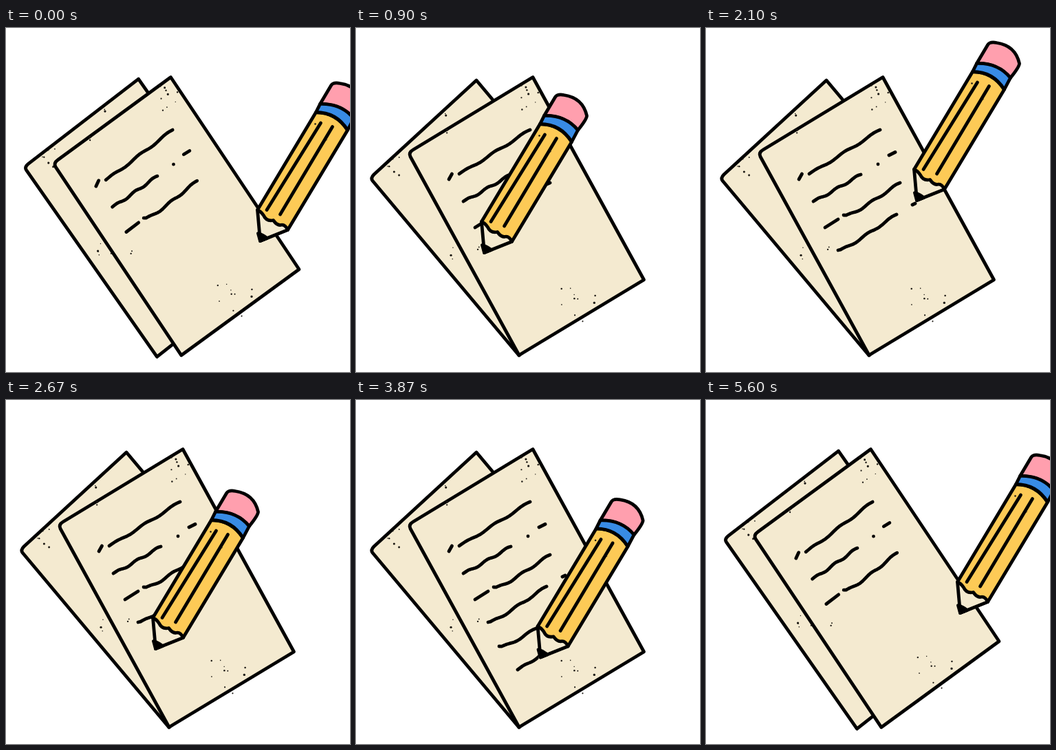
An HTML page with a canvas that plays this animation: 500x500 px, repeating every 5.73 s.

```html
<!DOCTYPE html>
<html lang="en">
<head>
<meta charset="utf-8">
<title>Pencil and paper</title>
<style>
html, body { margin: 0; width: 100%; height: 100%; overflow: hidden; background: #fff; }
canvas { display: block; }
</style>
</head>
<body>
<canvas id="stage" width="500" height="500"></canvas>
<script>
const ctx = document.getElementById('stage').getContext('2d');
const LOOP = 5730, PAPER = '#f4ead0', INK = '#000';

const point = (x, y) => ({ x, y });
const clamp = v => Math.min(1, Math.max(0, v));
const smooth = v => v * v * (3 - 2 * v);
const mix = (a, b, u) => point(a.x + (b.x - a.x) * u, a.y + (b.y - a.y) * u);

// The pencil arrives at a line, writes it from start to end, then moves on
const rest = point(371, 310);
const passes = [
  { start: point(188, 327), end: point(308, 251), arrive: 11, write: 14.8, done: 26 },
  { start: point(219, 362), end: point(338, 285), arrive: 33, write: 34, done: 40 },
  { start: point(235, 397), end: point(356, 318), arrive: 46, write: 46, done: 53 }
];
const wipe = { from: 57.8, to: 70, width: 120 };

function tipAt(step) {
  let at = rest, left = 0;
  for (const p of passes) {
    if (step < p.arrive) return mix(at, p.start, smooth((step - left) / (p.arrive - left)));
    if (step < p.done) return mix(p.start, p.end, clamp((step - p.write) / (p.done - p.write)));
    at = p.end;
    left = p.done;
  }
  return mix(at, rest, clamp(step - left));
}

// Handwritten line: a sagging bow with a slight ripple
function scribble(x0, y0, x1, y1, bow) {
  ctx.beginPath();
  for (let u = 0; u <= 1.001; u += 1 / 24) {
    const sag = bow * Math.sin(Math.PI * Math.sqrt(u)) - 1.4 * Math.sin(5 * Math.PI * u);
    ctx.lineTo(x0 + (x1 - x0) * u, y0 + (y1 - y0) * u + sag);
  }
  ctx.stroke();
}

function dash(x, y, dx = 0, dy = -dx * 0.5) {
  ctx.beginPath();
  ctx.moveTo(x, y);
  ctx.lineTo(x + dx, y + dy);
  ctx.stroke();
}

function shape(d, fill) {
  const path = new Path2D(d);
  ctx.fillStyle = fill;
  ctx.fill(path);
  ctx.stroke(path);
}

function speck(x, y, r) {
  ctx.fillStyle = '#1a1712';
  ctx.beginPath();
  ctx.arc(x, y, r, 0, 7);
  ctx.fill();
}

// Seeded patch of ink specks
function specks(x, y, w, h, count) {
  let seed = x * 31 + y;
  const random = () => (seed = (seed * 16807 + 11) % 2147483647) / 2147483647;
  random();
  for (let i = 0; i < count; i++) {
    speck(x + (random() - 0.5) * w, y + (random() - 0.5) * h, 0.7 + random());
  }
}

function turned(cx, cy, degrees, paint) {
  ctx.save();
  ctx.translate(cx, cy);
  ctx.rotate(degrees * Math.PI / 180);
  ctx.translate(-cx, -cy);
  paint();
  ctx.restore();
}

function backSheet() {
  shape('M176 77 L27 214 Q22 219 25 223 L238 477 L391 333 Z', PAPER);
  specks(130, 133, 8, 16, 2);
  specks(60, 202, 40, 30, 6);
  specks(149, 331, 20, 30, 4);
}

function frontSheet() {
  shape('M258 72.5 L84 178 Q77 182 80 188 L238 476.5 L419.5 367 Z', PAPER);
  specks(252, 102, 28, 36, 9);
  specks(137, 150, 30, 10, 2);
  specks(179, 322, 4, 8, 2);
  specks(320, 400, 62, 56, 10);

  dash(136, 221, 4.5, -8);
  scribble(151, 213, 254, 149, 1);
  dash(251, 199);
  dash(267, 186, 9);
  scribble(157, 253, 226, 214, 1);
  dash(174, 291, 19, -12);
  scribble(201, 273, 283, 226, 5);
}

const writtenLines = [
  () => { scribble(193, 324, 278, 272, 3.5); dash(301, 258, 4); },
  () => { scribble(209, 359, 299, 310, 5); dash(326, 294, 5); },
  () => { scribble(236, 393, 316, 340, 1); dash(348, 327, 2); }
];

// Each line shows up to the pencil tip, and later vanishes from its left end
function drawWritten(step, tip) {
  const wiped = passes.length * clamp((step - wipe.from) / (wipe.to - wipe.from));
  passes.forEach((p, i) => {
    const gone = clamp(wiped - i);
    const left = gone && p.start.x - 5 + gone * wipe.width;
    const right = step < p.done ? tip.x - 3 : 500;
    if (step < p.write || gone === 1 || right <= left) return;
    ctx.save();
    ctx.beginPath();
    ctx.rect(left, 0, right - left, 500);
    ctx.clip();
    writtenLines[i]();
    ctx.restore();
  });
}

function drawPencil({ x, y }) {
  ctx.save();
  ctx.translate(x - 0.5, y + 0.5);
  shape('M-4 -45 L0 0 L40 -16 L30 -40 Z', PAPER);
  shape('M-3 -11 Q4 -9 10 -4 L0 0 Z', INK);
  shape('M81 -187 Q110 -187 127 -161 L40 -16 Q36 -25 29 -23 Q24 -23 19 -30 Q9 -28 5 -37 Q1 -43 -4 -45 Z', '#fdca56');
  shape('M87 -199 L103 -226 Q106 -231 116 -229 Q143 -225 149 -199 Q149 -194 136 -178 Q118 -199 87 -199 Z', '#ff9fae');
  shape('M87 -199 Q118 -200 136 -178 L127 -161 Q111 -187 81 -187 Z', '#388be5');
  dash(88, -171.5, -78.5, 126.5);
  dash(105, -166, -76, 127.5);
  speck(80, -170, 1.3);
  speck(96, -147, 1.1);
  ctx.restore();
}

function draw(step) {
  const tip = tipAt(step);
  // 1 = sheets closed, 0 = fanned out
  const closed = 1 - clamp((step - 3) / 6) + clamp((step - 55) / 6);

  ctx.clearRect(0, 0, 500, 500);
  ctx.lineWidth = 4.8;
  ctx.lineCap = ctx.lineJoin = 'round';
  ctx.strokeStyle = INK;

  ctx.save();
  ctx.translate(-1, -1);
  turned(207, 277, 5 * closed, backSheet);
  turned(249, 273.5, -5 * closed, () => {
    frontSheet();
    drawWritten(step, tip);
  });
  drawPencil(tip);
  ctx.restore();
}

// Drawn in 80 ms steps, shown on a 30 fps grid
function stepAt(ms) {
  const tick = Math.floor((ms % LOOP + 4) * 0.03);
  return Math.floor(tick * 5 / 12);
}

const start = performance.now();
function play() {
  draw(stepAt(performance.now() - start));
  requestAnimationFrame(play);
}
play();
</script>
</body>
</html>
```
